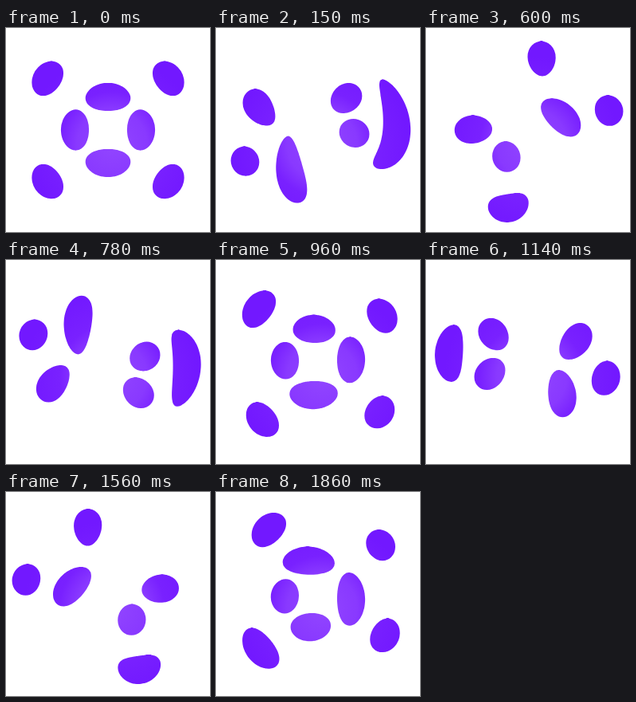
An HTML page with a canvas that plays this animation: 256 px wide and 256 px high, repeating every 1.89 s.

```html
<!DOCTYPE html>
<html>
<head>
<meta charset="utf-8">
<style>
  html, body { margin: 0; width: 100%; height: 100%; overflow: hidden; background: #fff; }
  canvas { display: block; width: 100vw; height: 100vh; }
</style>
</head>
<body>
<canvas width="256" height="256"></canvas>
<script>
// A knotted tube tumbles through the screen plane; only its cross-section shows.
const ctx = document.querySelector('canvas').getContext('2d');
const LOOP = 1890, STEP = 30, SAMPLES = 2000;
const TUBE = 17.6;              // tube radius
const BIG = 71, SMALL = 29.5;   // the knot's two circling radii
const RISE = 53, SADDLE = 9;    // its depth waves
const { sin, cos, PI } = Math;

const tone = s => `rgb(${98 + 60 * s},${88 * s},255)`;
const paint = ctx.createRadialGradient(133, 146, 0, 133, 146, 110);
paint.addColorStop(0, tone(0.8));
paint.addColorStop(0.4, tone(0.65));
paint.addColorStop(0.6, tone(0.38));
paint.addColorStop(1, tone(0.27));

const knot = s => [
  BIG * cos(3 * s) - SMALL * cos(s),
  BIG * sin(3 * s) + SMALL * sin(s),
  RISE * sin(4 * s) + SADDLE * sin(2 * s)
];

const rotate = (a, b, angle) => [
  a * cos(angle) - b * sin(angle),
  a * sin(angle) + b * cos(angle)
];

function draw(t) {
  const turn = 2 * PI * t / LOOP;
  ctx.fillStyle = '#fff';
  ctx.fillRect(0, 0, 256, 256);
  ctx.fillStyle = paint;
  ctx.beginPath();
  for (let i = 0; i < SAMPLES; i++) {
    let [x, y, z] = knot(2 * PI * i / SAMPLES);
    [y, z] = rotate(y, z, 2 * turn);
    [x, z] = rotate(x, z, turn);
    if (Math.abs(z) >= TUBE) continue;
    const r = Math.sqrt(TUBE * TUBE - z * z);
    ctx.moveTo(128 + x + r, 128 + y);
    ctx.arc(128 + x, 128 + y, r, 0, 2 * PI);
  }
  ctx.fill();
}

const start = performance.now();
function frame() {
  const t = (performance.now() - start) % LOOP;
  draw(Math.floor(t / STEP) * STEP);
  requestAnimationFrame(frame);
}
frame();
</script>
</body>
</html>
```
